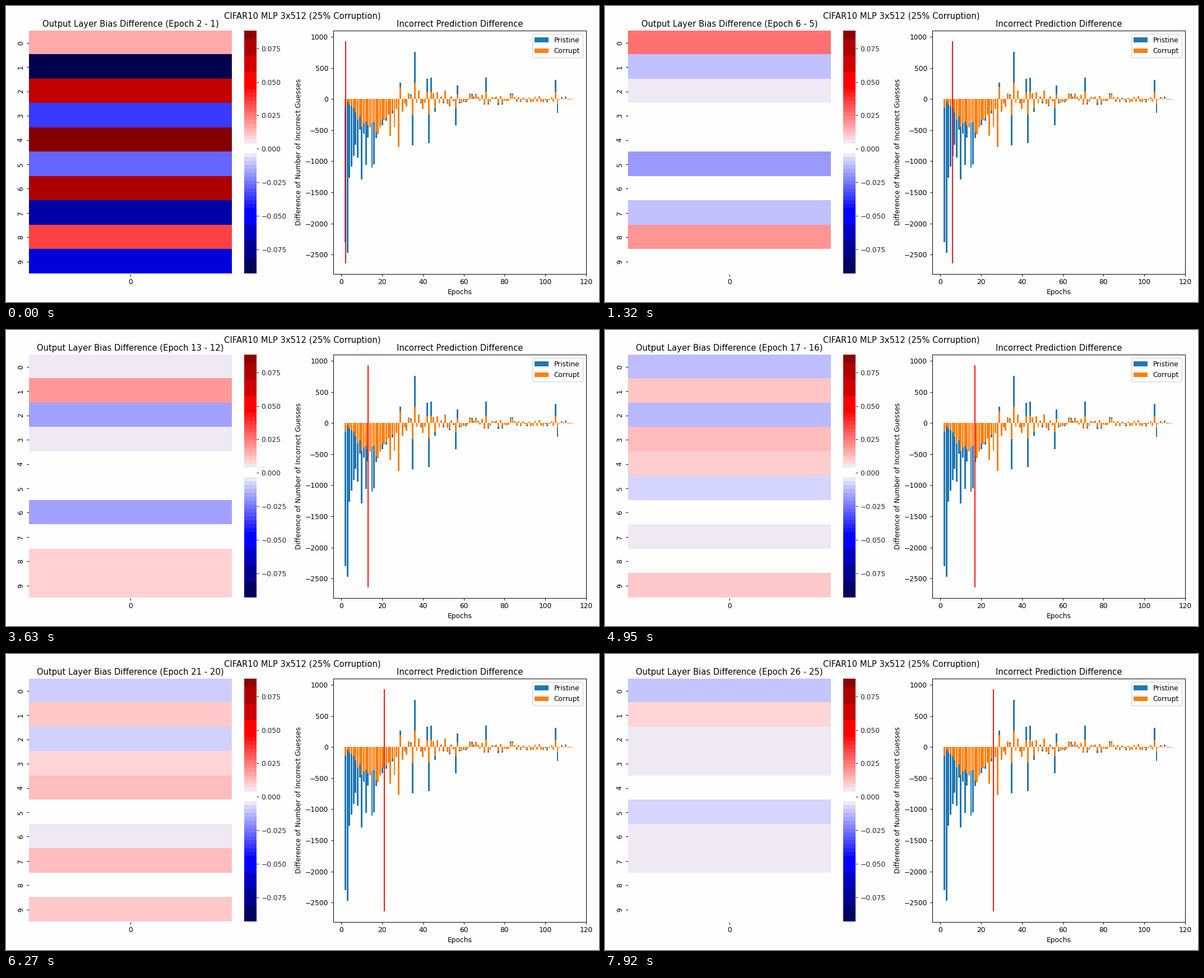
Recreate the animation shown at these times as a matplotlib script. Size 1058 px wide and 529 px high, loop 8 s.

```python
import numpy as np
import matplotlib.pyplot as plt
from matplotlib.animation import FuncAnimation
from matplotlib.collections import PolyCollection
from matplotlib.colors import to_rgb

W, H = 1058, 529
TOP, BOTTOM = 44, 478.5
STEP_MS, INTERVAL, LOOP = 330, 40, 8000
FIRST, LAST, FINAL = 2, 26, 113
BACK, TINT = "#fefefe", "#eee9f3"
BLUE, ORANGE = "#1f77b4", "#ff7f0e"
T_MAX = 0.0933          # bias difference at full colour
V_MIN, V_MAX = -0.0933, 0.0883

# Bias steps of the ten classes at a few epochs, as shares of T_MAX.
KEYS = {
    2: [.17, -1, .73, -.39, .97, -.3, .82, -.74, .37, -.6],
    6: [.28, -.12, -.05, 0, 0, -.2, 0, -.12, .21, 0],
    13: [.05, .2, -.18, .05, 0, 0, -.18, 0, .09, .09],
    26: [-.11, .08, .05, .05, 0, -.08, .05, .05, 0, 0],
}

# Outstanding epochs of the bar chart.
PEAKS = {8: -945, 10: -1290, 12: -1060, 15: -1100, 16: -1050, 35: -745,
         36: 760, 42: 325, 43: -705, 44: 340, 56: -420, 57: 220, 71: 345,
         105: 310, 106: -225}
CORRUPT_PEAKS = {24: -590, 26: -445, 28: -775}


def bias_steps():
    """Rows of bias steps per epoch: eased between the keys, plus noise."""
    rng = np.random.default_rng(4)
    epochs = np.arange(1, LAST + 1)
    known = list(KEYS)
    rows = [np.interp(np.log(epochs), np.log(known), values)
            for values in zip(*KEYS.values())]
    noise = rng.normal(0, 0.06, (10, LAST))
    noise[:, np.isin(epochs, known)] = 0
    return dict(zip(epochs, (rows + noise).T))


def guess_changes():
    """Epochs with the pristine and corrupt changes in wrong guesses."""
    rng = np.random.default_rng(11)
    x = np.arange(FIRST, FINAL + 1)
    early = np.interp(x, [2, 3, 8, 13, 18, 20, 23, 25],
                      [-150, -45, -240, -460, -620, -340, -280, -190])
    swing = (230 * np.exp((25 - x) / 36) + 25) * np.clip((114 - x) / 8, 0, 1)
    late = swing * rng.uniform(0.2, 1, x.size)
    late *= rng.choice([-1, 1], x.size, p=[0.6, 0.4])
    corrupt = np.where(x < 26, early * rng.uniform(0.9, 1.1, x.size), late)
    falling = np.interp(x, [2, 3, 4, 7, 9, 13], [-2300, -2465, -1265, -735, -490, -615])
    pristine = np.where(x < 14, falling, corrupt * rng.uniform(0.2, 1.6, x.size))
    for epoch, value in PEAKS.items():
        pristine[epoch - FIRST] = value
        corrupt[epoch - FIRST] = 0.35 * value
    for epoch, value in CORRUPT_PEAKS.items():
        pristine[epoch - FIRST] = corrupt[epoch - FIRST] = value
    return x, pristine, corrupt


def shade(t):
    """RGB for shares t, with a white core and a pale tint around zero."""
    rgb = plt.get_cmap("seismic")((1 + t) / 2)[..., :3]
    rgb[np.abs(t) < 0.066] = to_rgb(TINT)
    rgb[np.abs(t) < 0.031] = to_rgb(BACK)
    return rgb


def banded(t):
    """Round shares to fine pale steps and four broad dark ones."""
    fine = np.linspace(0.034, 0.475, 15)
    edges = np.array([0, *fine, *np.linspace(0.61, 1.01, 4)])
    mids = (edges[1:] + edges[:-1]) / 2
    mids[fine.size] = 0.5
    return np.sign(t) * mids[np.digitize(np.abs(t), edges) - 1]


def add_axes(left, right):
    box = [left / W, 1 - BOTTOM / H, (right - left) / W, (BOTTOM - TOP) / H]
    return fig.add_axes(box, facecolor=BACK)


def add_bars(x, heights, color, label):
    quads = [[(e - .4, 0), (e - .4, y), (e + .4, y), (e + .4, 0)]
             for e, y in zip(x, heights)]
    guess.add_collection(PolyCollection(quads, facecolors=color,
                                        edgecolors="none", label=label))


fig = plt.figure(figsize=(12, 6), dpi=W / 12, facecolor=BACK)
fig.suptitle("CIFAR10 MLP 3x512 (25% Corruption)")

heat = add_axes(41.4, 402.7)
heat_img = heat.imshow(np.ones((10, 1, 3)), aspect="auto",
                       interpolation="nearest")
heat.set_xticks([0])
heat.set_yticks(range(10))
heat.set_yticklabels(range(10), rotation=90, va="center")
heat.spines[:].set_visible(False)
title = heat.set_title("")

bar = add_axes(425.2, 446.9)
scale = np.linspace(V_MAX, V_MIN, 434)[:, None] / T_MAX
bar.imshow(shade(banded(scale)), aspect="auto", interpolation="nearest",
           extent=(0, 1, V_MIN, V_MAX))
bar.set_xticks([])
bar.set_yticks(np.arange(-3, 4) * 0.025)
bar.yaxis.tick_right()
bar.tick_params(color="#262626", labelcolor="#262626")
bar.spines[:].set_visible(False)

guess = add_axes(583.7, 1035.1)
epochs, pristine, corrupt = guess_changes()
add_bars(epochs, pristine, BLUE, "Pristine")
add_bars(epochs, corrupt, ORANGE, "Corrupt")
marker, = guess.plot([FIRST, FIRST], [-2628, 921], color="red", lw=1.5)
guess.set_xlim(-4.04, 120.04)
guess.set_ylim(-2806, 1098)
guess.set_title("Incorrect Prediction Difference")
guess.set_xlabel("Epochs")
guess.set_ylabel("Difference of Number of Incorrect Guesses")
guess.legend(loc="upper right")

steps = bias_steps()


def draw(i):
    # The epoch reached by the end of this frame's time slot.
    epoch = FIRST + ((i + 1) * INTERVAL - 1) // STEP_MS
    heat_img.set_data(shade(steps[epoch][:, None]))
    title.set_text(f"Output Layer Bias Difference (Epoch {epoch} - {epoch - 1})")
    marker.set_xdata([epoch, epoch])
    return heat_img, title, marker


anim = FuncAnimation(fig, draw, frames=LOOP // INTERVAL, interval=INTERVAL,
                     repeat=True, repeat_delay=0)
plt.show()
```
